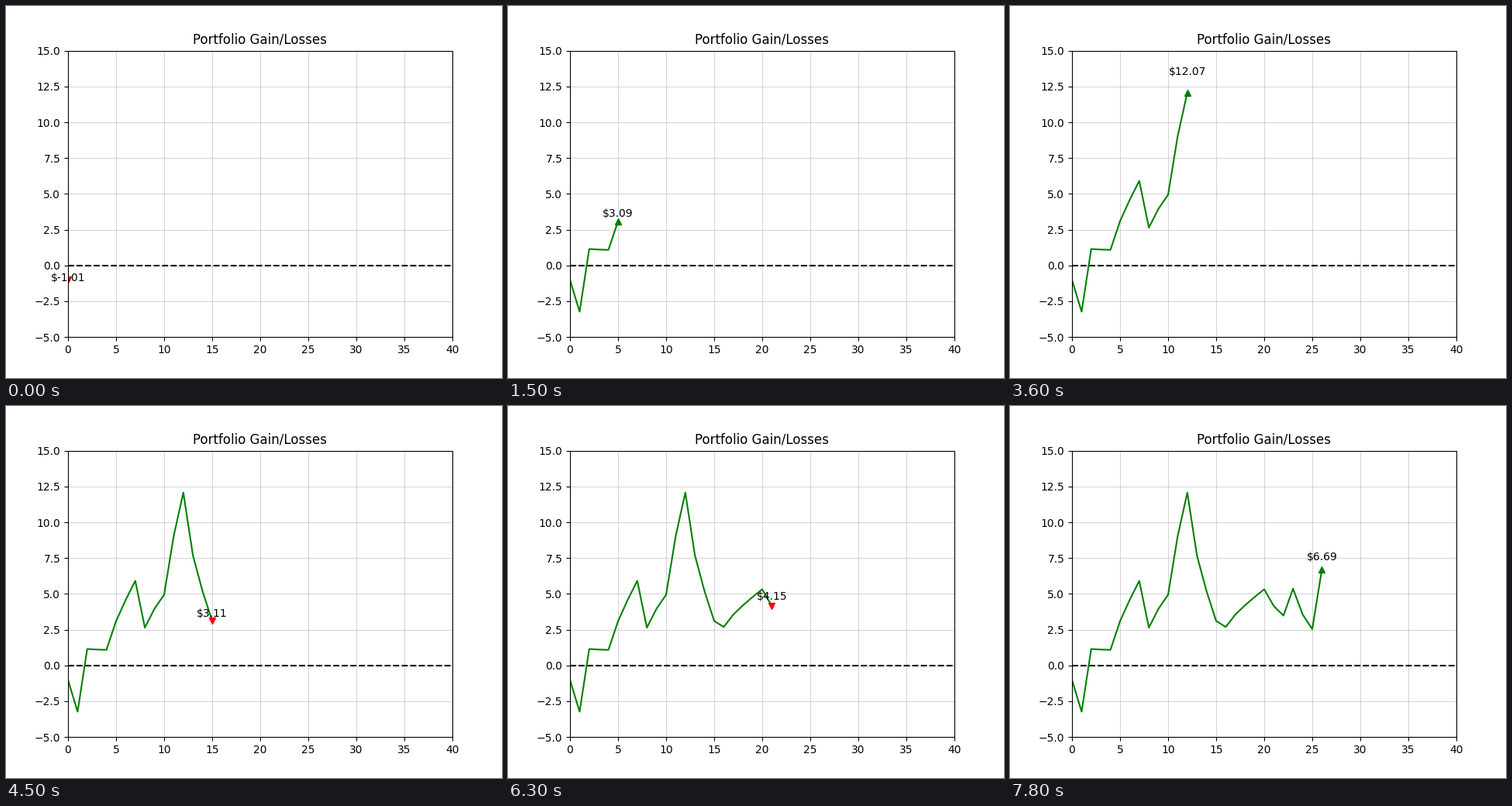
These frames come from a looping animation (640 by 480 pixels, 8000 ms). A matplotlib script:

```python
import matplotlib.pyplot as plt
from matplotlib.animation import FuncAnimation

INTERVAL = 100       # ms per tick
TICKS_PER_POINT = 3  # a new value every 300 ms
TICKS = 80

# Day and gain where the trend turns
TURNS = {0: -1.01, 1: -3.23, 2: 1.15, 4: 1.09, 7: 5.91, 8: 2.64,
         10: 4.94, 12: 12.07, 15: 3.11, 16: 2.69, 20: 5.32,
         22: 3.48, 23: 5.36, 25: 2.54, 26: 6.69}


def gain(day):
    """Ease out from one turn to the next; falls start faster than rises."""
    if day in TURNS:
        return TURNS[day]
    start = max(d for d in TURNS if d < day)
    end = min(d for d in TURNS if d > day)
    change = TURNS[end] - TURNS[start]
    progress = (day - start) / (end - start)
    return TURNS[start] + change * progress ** (0.8 if change > 0 else 0.65)


gains = [gain(day) for day in range(max(TURNS) + 1)]

fig, ax = plt.subplots(figsize=(6.4, 4.8), dpi=100)
ax.set_title("Portfolio Gain/Losses", x=0.498, pad=6.7)
ax.set_xlim(0, 40)
ax.set_ylim(-5, 15)
ax.grid(alpha=0.5)
ax.axhline(0, color="black", linestyle="--")

line, = ax.plot([], [], color="green")
marker, = ax.plot([], [], linestyle="none")
label = ax.text(0, 0, "", ha="center")


def update(tick):
    day = tick // TICKS_PER_POINT
    value = gains[day]
    previous = gains[day - 1] if day else 0
    rising = value > previous

    line.set_data(range(day + 1), gains[:day + 1])
    marker.set_data([day], [value])
    marker.set_marker("^" if rising else "v")
    marker.set_color("green" if rising else "red")
    label.set_position((day, value * 1.1))
    label.set_text(rf"\${value:.2f}")
    return line, marker, label


animation = FuncAnimation(fig, update, frames=TICKS, interval=INTERVAL,
                          repeat=True, repeat_delay=0)
plt.show()
```
